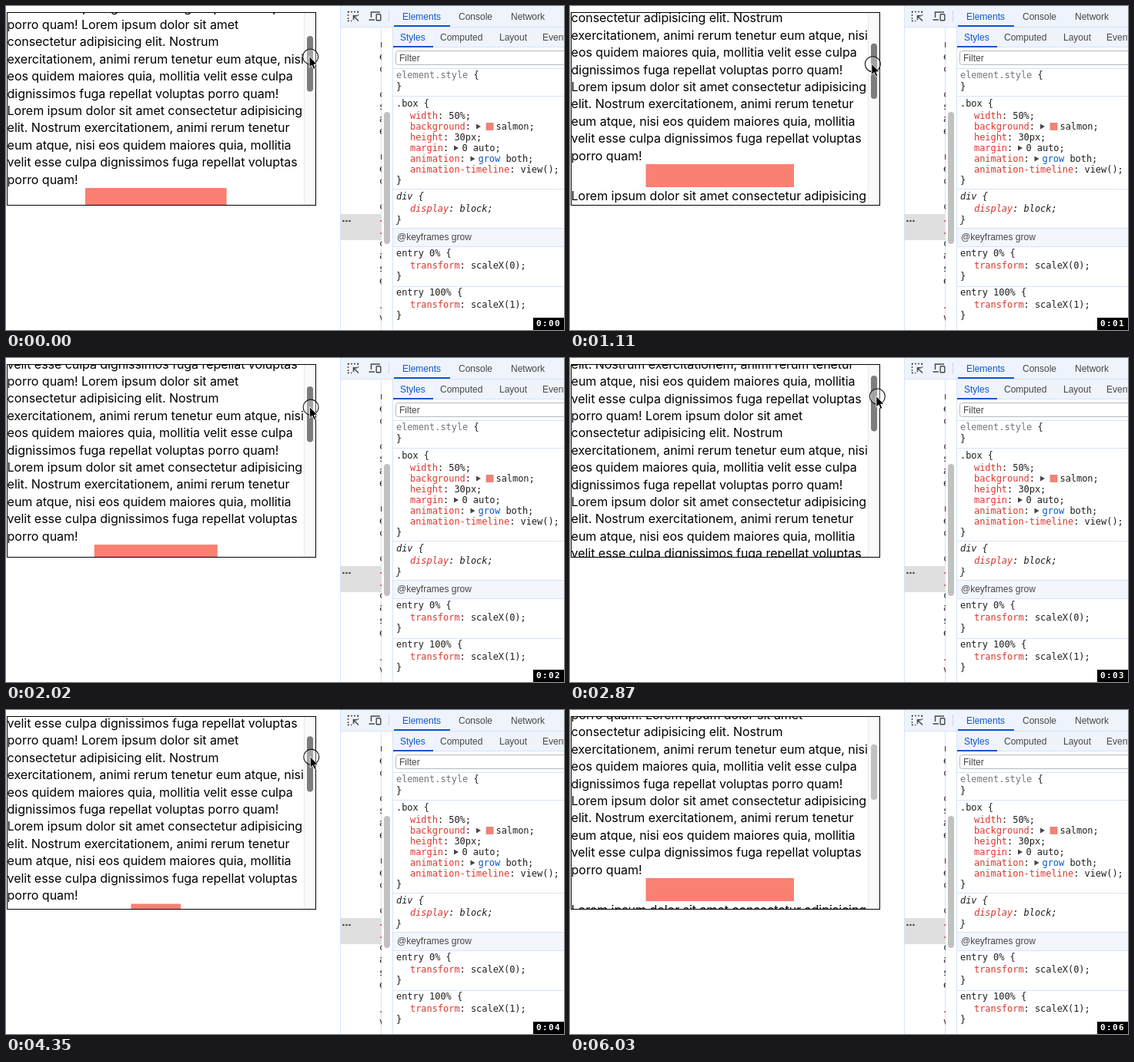
An HTML page that plays this animation: 725 by 422 pixels, repeating every 6390 ms.

```html
<!DOCTYPE html>
<html lang="en">
<head>
<meta charset="utf-8">
<title>Scroll-driven animation</title>
<style>
html, body { margin: 0; width: 100%; height: 100%; overflow: hidden; background: #fff; }
svg { display: block; width: 725px; height: 422px; }
text { white-space: pre; }
.prose { font: 16px Inter, "Open Sans", sans-serif; letter-spacing: -.04px; fill: #000; }
.ui { font: 12px "Liberation Sans", Arial, sans-serif; fill: #474747; }
.on { fill: #0b57d0; }
.code { font: 12px "DejaVu Sans Mono", Menlo, monospace; letter-spacing: -.05px; fill: #1f1f1f; }
.prop { fill: #dc362e; }
.dim { fill: #757575; }
.it { font-style: italic; }
.clock { font: bold 11px "DejaVu Sans Mono", monospace; letter-spacing: 1.4px; fill: #fff; }
</style>
</head>
<body>
<svg id="stage" viewBox="0 0 725 422">
  <defs>
    <clipPath id="view"><rect x="2" y="9" width="400" height="250"/></clipPath>
    <clipPath id="tree"><rect x="435" y="28" width="53" height="394"/></clipPath>
  </defs>
  <g clip-path="url(#view)">
    <g id="page"></g>
    <rect id="bar" height="30" fill="salmon"/>
    <rect x="387" y="9" width="15" height="250" fill="#fafafa"/>
    <path d="M387.5 9V259" stroke="#e8e8e8"/>
    <rect id="thumb" x="391" width="8" height="72.4" rx="4"/>
  </g>
  <rect x="1.5" y="8.5" width="401" height="251" fill="none" stroke="#000"/>
  <g id="tools"></g>
  <g id="pointer">
    <circle r="10" fill="#fff" fill-opacity=".3" stroke="#111" stroke-width="1.1"/>
    <path d="M-1.5 -.5V14L1.8 11L4.1 16.4L6.6 15.3L4.3 10.1H8.8Z" fill="#000" stroke="#fff" stroke-width=".9"/>
  </g>
  <rect x="685" y="406" width="40" height="16" fill="#000"/>
  <text id="clock" class="clock" x="689" y="417.3"></text>
</svg>
<script>
const LOOP = 6390, RELEASE = 6030, LINE = 22.4;
const $ = id => document.getElementById(id);

function add(parent, tag, attrs, text) {
  const el = document.createElementNS('http://www.w3.org/2000/svg', tag);
  for (const k in attrs) el.setAttribute(k, attrs[k]);
  if (text !== undefined) el.textContent = text;
  parent.appendChild(el);
  return el;
}

// Scrolled page; y = 0 is the top edge of the salmon bar
const page = $('page');
const prose = [
  'Lorem ipsum dolor sit amet consectetur adipisicing',
  'elit. Nostrum exercitationem, animi rerum tenetur',
  'eum atque, nisi eos quidem maiores quia, mollitia',
  'velit esse culpa dignissimos fuga repellat voluptas',
  'porro quam! Lorem ipsum dolor sit amet',
  'consectetur adipisicing elit. Nostrum',
  'exercitationem, animi rerum tenetur eum atque, nisi',
  'eos quidem maiores quia, mollitia velit esse culpa',
  'dignissimos fuga repellat voluptas porro quam!'
];
const above = [...prose, ...prose.slice(0, 4), 'porro quam!'];
const line = (s, y) => add(page, 'text', { class: 'prose', x: 1.6, y }, s);
above.forEach((s, i) => line(s, -5.4 - (above.length - 1 - i) * LINE));
prose.slice(0, 2).forEach((s, i) => line(s, 47 + i * LINE));

// Inspector
const tools = $('tools');
const rect = (x, y, w, h, fill, more) => add(tools, 'rect', { x, y, width: w, height: h, fill, ...more });
const path = (d, stroke, more) => add(tools, 'path', { d, stroke, fill: 'none', ...more });
const label = (x, y, s, cls = '') => add(tools, 'text', { x, y, class: 'ui ' + cls }, s);
const code = (x, y, s, cls = '') => add(tools, 'text', { x, y, class: 'code ' + cls }, s);
const EDGE = '#d3e3fd';

rect(434, 0, 291, 27, '#eff3fb');
rect(502, 27, 223, 27, '#eff3fb');
path('M434.5 0V422M434 27.5H725M502.5 27V422M502 53.5H725M502 81.5H725M487.5 28V422', EDGE);
path('M497.5 6V21', '#c8d6ee');

path('M444.5 9V7.5H446M448 7.5H450M452 7.5H454M456 7.5H457.5V9M444.5 11V13M444.5 15V17M444.5 18.5V19.5H446M448 19.5H449.5M457.5 11V12.5', '#474747', { 'stroke-width': 1.4 });
path('M458 19.5L451.5 13M451.5 18V12.8H456.5', '#474747', { 'stroke-width': 1.5 });
path('M474.5 15V8H486M471.5 18H479', '#474747', { 'stroke-width': 1.5 });
rect(481.2, 10.7, 5.6, 8.1, 'none', { stroke: '#474747', 'stroke-width': 1.4, rx: .8 });

label(515, 18, 'Elements', 'on');
label(588, 18, 'Console');
label(656, 18, 'Network');
rect(504, 25, 73, 2, '#0b57d0');
label(512, 45, 'Styles', 'on');
label(564, 45, 'Computed');
label(641, 45, 'Layout');
label(697, 45, 'Event Listeners');
rect(503, 52, 52, 2, '#0b57d0');
rect(506.5, 58.5, 230, 18, '#fff', { rx: 3, stroke: '#b4b8c0' });
label(511, 72, 'Filter');

// Clipped edge of the element tree
rect(435, 271, 53, 34, '#dfdfdf');
[0, 4, 8].forEach(d => add(tools, 'circle', { cx: 438.5 + d, cy: 280, r: 1.3, fill: '#474747' }));
const tree = add(tools, 'g', { 'clip-path': 'url(#tree)' });
[...'rec csae rec c..case .v'].forEach((c, i) =>
  add(tree, 'text', { x: c === '.' ? 483.5 : 485, y: 54 + i * 16.2, class: 'code' + (c === '.' ? ' prop' : '') }, c));
rect(491, 138, 8, 172, '#c1c1c1', { rx: 4 });

// Style rules
function decl(y, name, value, cls = '') {
  const t = code(525, y, '', cls);
  add(t, 'tspan', { class: 'prop' }, name);
  add(t, 'tspan', {}, ': ' + value);
}
const arrow = (x, y) => add(tools, 'path', { d: `M${x} ${y - 7.5}l6 3.5l-6 3.5Z`, fill: '#474747' });

rect(503, 290, 222, 23, '#f3f6fc');
path('M503 117.5H725M503 238.5H725M503 289.5H725M503 313.5H725M503 365.5H725', EDGE);

const head = code(507, 94, '');
add(head, 'tspan', { class: 'dim' }, 'element.style');
add(head, 'tspan', {}, ' {');
code(507, 109, '}');

code(507, 131, '.box {');
decl(147, 'width', '50%;');
decl(161, 'background', '');
arrow(611, 161);
rect(624, 152.5, 9, 9, 'salmon', { stroke: '#b9766f', 'stroke-width': .6 });
code(636.5, 161, 'salmon;');
decl(175, 'height', '30px;');
decl(189, 'margin', '');
arrow(582, 189);
code(592.5, 189, '0 auto;');
decl(203, 'animation', '');
arrow(603.5, 203);
const grow = code(613.5, 203, '');
add(grow, 'tspan', { class: 'on' }, 'grow');
add(grow, 'tspan', {}, ' both;');
decl(217, 'animation-timeline', 'view();');
code(507, 231, '}');

code(507, 252, 'div {', 'it');
decl(268, 'display', 'block;', 'it');
code(507, 283, '}', 'it');

label(508, 305, '@keyframes grow');
[[326, '0%', 0], [377, '100%', 1]].forEach(([y, at, scale]) => {
  code(507, y, `entry ${at} {`);
  decl(y + 16, 'transform', `scaleX(${scale});`);
  code(507, y + 30, '}');
});

// Bar position over time, joined by a monotone cubic
const keys = [
  [0, 237], [60, 237], [530, 214.5], [670, 210], [930, 206], [1110, 206], [1470, 218],
  [1720, 231], [2020, 243], [2340, 268], [2870, 288], [3010, 290], [3400, 290],
  [4050, 264], [4350, 252.5], [4670, 243], [5230, 226], [5410, 225], [6030, 219], [LOOP, 219]
];
const rise = i => i < 0 || i > keys.length - 2 ? 0
  : (keys[i + 1][1] - keys[i][1]) / (keys[i + 1][0] - keys[i][0]);
function slope(i) {
  const a = rise(i - 1), b = rise(i);
  return a * b > 0 ? 2 * a * b / (a + b) : 0;
}
function barTop(t) {
  let i = 0;
  while (i < keys.length - 2 && t >= keys[i + 1][0]) i++;
  const [t0, y0] = keys[i], [t1, y1] = keys[i + 1];
  const d = t1 - t0, u = (t - t0) / d, v = 1 - u;
  return y0 * (1 + 2 * u) * v * v + slope(i) * d * u * v * v
    + y1 * u * u * (3 - 2 * u) - slope(i + 1) * d * u * u * v;
}

// CSS "ease": cubic-bezier(.25, .1, .25, 1)
function ease(x) {
  if (x <= 0 || x >= 1) return x <= 0 ? 0 : 1;
  const bez = (a, b, s) => 3 * a * s * (1 - s) ** 2 + 3 * b * s * s * (1 - s) + s ** 3;
  let lo = 0, hi = 1;
  for (let n = 0; n < 24; n++) {
    const mid = (lo + hi) / 2;
    if (bez(.25, .25, mid) < x) lo = mid; else hi = mid;
  }
  return bez(.1, 1, lo);
}

function set(id, attrs) {
  for (const k in attrs) $(id).setAttribute(k, attrs[k]);
}

function draw(t) {
  const top = barTop(t), width = 192.5 * ease((259 - top) / 30);
  const thumb = 39 + (237 - top) / 3.2, y = thumb + 27;
  const held = t < RELEASE;
  set('page', { transform: `translate(0 ${top})` });
  set('bar', { x: 194.75 - width / 2, y: top, width });
  set('thumb', { y: thumb, fill: held ? '#7d7d7d' : '#c1c1c1' });
  set('pointer', {
    transform: `translate(${395.5 + (66.5 - y) * .235} ${y})`,
    visibility: held ? 'visible' : 'hidden'
  });
  $('clock').textContent = '0:0' + Math.floor((t + 50) / 970);
}

const start = performance.now();
function tick() {
  draw((performance.now() - start) % LOOP);
  requestAnimationFrame(tick);
}
tick();
</script>
</body>
</html>
```
